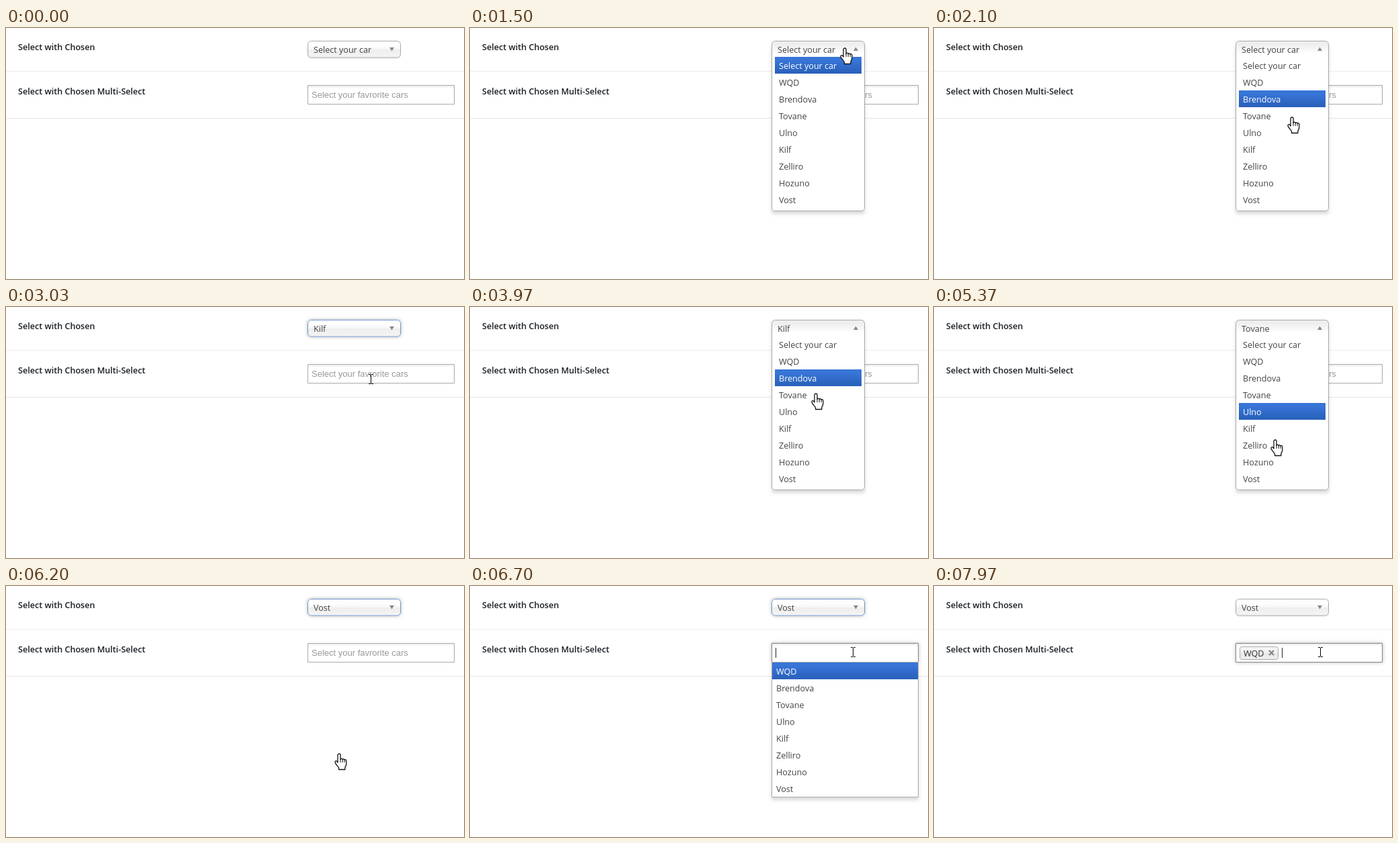
Animation of 682 by 374 pixels, one loop 8000 ms. Source, as an HTML page with a canvas:

```html
<!DOCTYPE html>
<html lang="en">
<head>
<meta charset="utf-8">
<title>Select fields</title>
<style>
html, body { margin: 0; width: 682px; height: 374px; overflow: hidden; background: #fff; }
canvas { display: block; }
</style>
</head>
<body>
<canvas id="stage" width="682" height="374"></canvas>
<script>
const ctx = document.getElementById('stage').getContext('2d');
const LOOP = 8000, ROW = 25, HOVER_LAG = 80;
const UI = '12.6px "Open Sans", "Noto Sans", sans-serif';
const LABEL = '600 ' + UI;
const INPUT = '13px "Liberation Sans", Arial, sans-serif';
const CARS = ['WQD', 'Brendova', 'Tovane', 'Ulno', 'Kilf', 'Zelliro', 'Hozuno', 'Vost'];
const OPTIONS = ['Select your car', ...CARS];

// Time, x, y of the pointer's hot spot.
const PATH = [
  [870, 667, 165], [1030, 640, 118], [1270, 558, 30], [1600, 558, 30], [1670, 556, 36],
  [1700, 556, 38], [2330, 520, 188], [2630, 520, 188], [3030, 544, 107], [3370, 552, 34],
  [3630, 552, 34], [3970, 515, 129], [4490, 515, 129], [4770, 545, 34], [4960, 545, 34],
  [5500, 496, 250], [6220, 496, 250], [6580, 571, 98], [7030, 571, 98], [7170, 556, 140],
  [7270, 556, 140], [7370, 553, 118], [7830, 553, 118], [7970, 576, 98]
];
const SINGLE_OPEN = [[1330, 2600], [3400, 4470], [4930, 6200]];
const PICKS = [[2600, 5], [4470, 3], [6200, 8]];
const MULTI_OPEN = 6640, MULTI_PICK = 7570, SINGLE_BLUR = 6730;

const HAND = new Path2D('M-2 13V2a2 2 0 0 1 4 0V8.5c0-1.8 3.2-1.8 3.2.4c0-1.8 3-1.4 3 .7c0-1.6 2.6-1.2 2.6 1V15c0 3-2 4-2 6V23.5H-.5V21C-2 18.5-4 17-5.7 13.6c-1.2-2.4 1-4 2.3-2.4Z');
const KNUCKLES = new Path2D('M2 8V13M5.2 9V13M8.2 10V13');
const ARROW = new Path2D('M.5.5V16.5L4.2 13L6.7 18.8L9.2 17.7L6.7 12.1H12Z');

function pointerAt(t) {
  if (t < PATH[0][0]) return null;
  const next = PATH.findIndex(p => p[0] > t);
  if (next < 0) return PATH[PATH.length - 1].slice(1);
  const [t0, x0, y0] = PATH[next - 1], [t1, x1, y1] = PATH[next];
  const u = (t - t0) / (t1 - t0);
  return [x0 + (x1 - x0) * u, y0 + (y1 - y0) * u];
}

function gradient(y, h, stops) {
  const g = ctx.createLinearGradient(0, y, 0, y + h);
  stops.forEach(([at, color]) => g.addColorStop(at, color));
  return g;
}

function text(str, x, y, font, color) {
  ctx.font = font;
  ctx.fillStyle = color;
  ctx.fillText(str, x, y);
}

function rect(x, y, w, h, color) {
  ctx.fillStyle = color;
  ctx.fillRect(x, y, w, h);
}

function box(x, y, w, h, { fill = '#fff', border = '#aaa', radius = 0, shadow }) {
  const shape = inset => {
    ctx.beginPath();
    ctx.roundRect(x + inset, y + inset, w - 2 * inset, h - 2 * inset, radius);
  };
  ctx.save();
  if (shadow) [ctx.shadowOffsetY, ctx.shadowBlur, ctx.shadowColor] = shadow;
  shape(0);
  ctx.fillStyle = '#fff';
  ctx.fill();
  ctx.restore();
  shape(0.5);
  ctx.fillStyle = fill;
  ctx.fill();
  ctx.strokeStyle = border;
  ctx.lineWidth = 1;
  ctx.stroke();
}

function list(items, x, y, w, textX, active) {
  items.forEach((item, i) => {
    const top = y + i * ROW;
    if (i === active) rect(x, top, w, ROW, gradient(top, ROW, [[0.2, '#3875d7'], [0.9, '#2a62bc']]));
    text(item, textX, top + 18, UI, i === active ? '#fff' : '#444');
  });
}

function triangle(up) {
  const base = up ? 34 : 29, tip = up ? 28.5 : 34.5;
  ctx.beginPath();
  ctx.moveTo(571, base);
  ctx.lineTo(578, base);
  ctx.lineTo(574.5, tip);
  ctx.fillStyle = '#888';
  ctx.fill();
}

function drawSingle(t, open) {
  const pick = PICKS.reduce((last, [at, i]) => t >= at ? i : last, 0);
  const focused = t >= PICKS[0][0] && t < SINGLE_BLUR && !open;
  if (open) {
    box(449, 19, 139, 254, { radius: [5, 5, 4, 4], shadow: [4, 5, 'rgba(0,0,0,.15)'] });
    box(449, 19, 139, 254, {
      radius: [5, 5, 4, 4],
      fill: gradient(19, 25, [[0.2, '#eee'], [0.8, '#fff']])
    });
    const at = pointerAt(t - HOVER_LAG);
    const hovered = Math.floor((at[1] - 43) / ROW);
    list(OPTIONS, 454, 43, 129, 460, hovered < 0 ? pick : hovered);
  } else {
    box(449, 19, 139, 25.5, {
      radius: 5,
      border: focused ? '#7398d0' : '#aaa',
      shadow: focused ? [0, 5, 'rgba(0,0,0,.3)'] : [1, 1, 'rgba(0,0,0,.1)'],
      fill: gradient(20, 24, [[0.2, '#fff'], [0.5, '#f6f6f6'], [0.52, '#eee'], [1, '#f4f4f4']])
    });
  }
  text(OPTIONS[pick], 458, 37, UI, '#444');
  triangle(open);
}

function drawChip() {
  box(455, 90, 58, 20, {
    radius: 3,
    fill: gradient(91, 18, [[0.2, '#f4f4f4'], [0.5, '#f0f0f0'], [0.52, '#e8e8e8'], [1, '#eee']])
  });
  text(CARS[0], 461, 105, UI, '#333');
  ctx.beginPath();
  ctx.moveTo(499, 96);
  ctx.lineTo(506, 103);
  ctx.moveTo(506, 96);
  ctx.lineTo(499, 103);
  ctx.strokeStyle = '#888';
  ctx.lineWidth = 2.4;
  ctx.stroke();
}

function drawMulti(t) {
  const focused = t >= MULTI_OPEN, picked = t >= MULTI_PICK;
  const open = focused && !picked;
  if (open) box(449, 113, 219, 202, { shadow: [4, 5, 'rgba(0,0,0,.15)'] });
  box(449, 85, 219, 29, {
    border: focused ? '#888' : '#aaa',
    shadow: focused && [0, 5, 'rgba(0,0,0,.3)'],
    fill: gradient(86, 27, [[0.01, '#eee'], [0.15, '#fff']])
  });
  if (!focused) text('Select your favrorite cars', 455, 104, INPUT, '#999');
  if (open) {
    box(449, 113, 219, 202, {});
    const at = pointerAt(t - HOVER_LAG);
    list(CARS, 450, 114, 217, 456, Math.max(0, Math.floor((at[1] - 114) / ROW)));
    if (t < MULTI_OPEN + 500) rect(455, 92, 1, 15, '#222');
  }
  if (picked) {
    drawChip();
    rect(518, 92, 1, 15, '#222');
  }
}

function drawBeam() {
  rect(-1, -6, 1, 13, '#000');
  for (const y of [-7, 7]) {
    rect(-4, y, 3, 1, '#000');
    rect(0, y, 3, 1, '#000');
  }
}

function drawPointer(t, singleOpen) {
  const at = pointerAt(t);
  if (!at) return;
  const [x, y] = at.map(Math.round);
  const inside = (left, top, w, h) => x >= left && x < left + w && y >= top && y < top + h;
  // A resting pointer keeps its hand shape after a click closes the list.
  const resting = t >= MULTI_OPEN && t < 7850 || PICKS.some(([at]) => t >= at && t < at + 30);
  const onSingle = inside(449, 19, 139, singleOpen ? 254 : 26);
  const onMulti = inside(449, 85, 219, 29);
  ctx.save();
  ctx.translate(x, y);
  if (onMulti && !singleOpen) {
    drawBeam();
  } else {
    const hand = onSingle || resting;
    const shape = hand ? HAND : ARROW;
    ctx.fillStyle = '#fff';
    ctx.strokeStyle = '#111';
    ctx.lineJoin = 'round';
    ctx.lineWidth = hand ? 1.3 : 1;
    ctx.fill(shape);
    ctx.stroke(shape);
    if (hand) {
      ctx.lineWidth = 1;
      ctx.stroke(KNUCKLES);
    }
  }
  ctx.restore();
}

function draw(t) {
  const singleOpen = SINGLE_OPEN.some(([from, to]) => t >= from && t < to);
  rect(0, 0, 682, 374, '#fff');
  rect(0, 64, 682, 1, '#eee');
  rect(0, 134, 682, 1, '#e5e5e5');
  text('Select with Chosen', 18, 33, LABEL, '#191e23');
  text('Select with Chosen Multi-Select', 18, 99, LABEL, '#191e23');
  drawMulti(t);
  drawSingle(t, singleOpen);
  drawPointer(t, singleOpen);
}

function frame() {
  draw(performance.now() % LOOP);
  requestAnimationFrame(frame);
}
frame();
</script>
</body>
</html>
```
